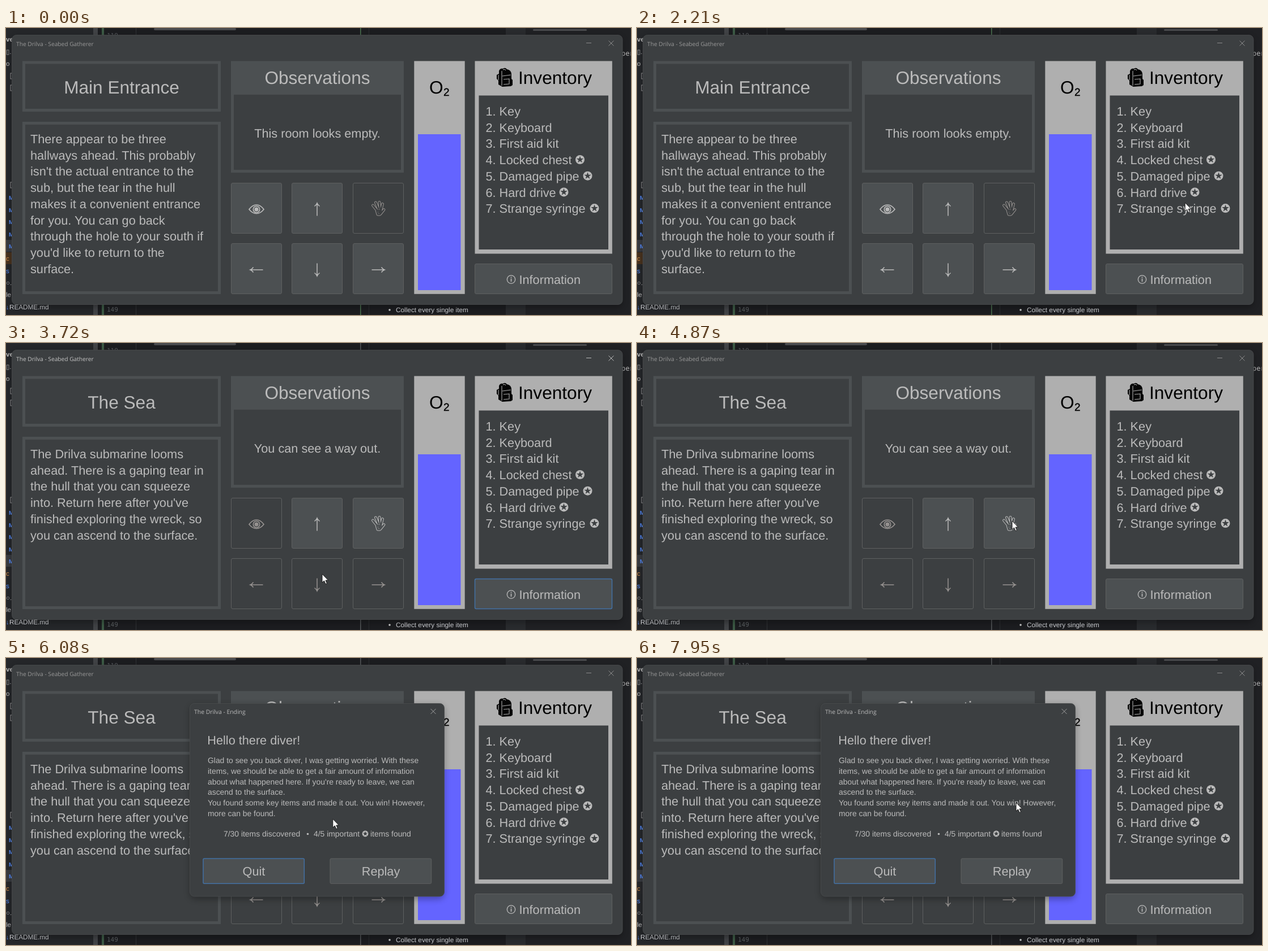
An HTML page for the animation above (8000 ms loop, 1103 by 508 pixels).

```html
<!DOCTYPE html>
<html lang="en">
<head>
<meta charset="utf-8">
<title>The Drilva</title>
<style>
  html, body { margin: 0; width: 100%; height: 100%; overflow: hidden; background: #1e1f22; }
  svg { display: block; width: 1103px; height: 508px; }
  text { font-family: "Liberation Sans", Arial, sans-serif; fill: #bbb; white-space: pre; text-rendering: geometricPrecision; }
  .ui { font-family: "Open Sans", "Noto Sans", sans-serif; }
  .mono { font-family: "DejaVu Sans Mono", monospace; }
</style>
</head>
<body>
<svg id="stage" viewBox="0 0 1103 508" xmlns="http://www.w3.org/2000/svg"></svg>
<script>
const NS = "http://www.w3.org/2000/svg";
const stage = document.getElementById("stage");
const BG = "#3c3f41", PANEL = "#4c5052", TEXT = "#bbbbbb", DIM = "#8b8b8b";
const LIGHT = "#afafaf", EDGE = "#5e6060", FOCUS = "#4270a4";
const HEADING = 31.6, BODY = 21.7, SMALL = 13.9;

function add(parent, tag, attrs = {}, content) {
  const node = document.createElementNS(NS, tag);
  set(node, attrs);
  if (content !== undefined) node.textContent = content;
  parent.appendChild(node);
  return node;
}
function set(node, attrs) {
  for (const key in attrs) node.setAttribute(key, attrs[key]);
}
const group = (parent, attrs) => add(parent, "g", attrs);
const rect = (parent, x, y, width, height, fill, more) =>
  add(parent, "rect", { x, y, width, height, fill, ...more });
const text = (parent, x, y, size, content, more) =>
  add(parent, "text", { x, y, "font-size": size, ...more }, content);
const path = (parent, d, more) => add(parent, "path", { d, ...more });
const centred = { "text-anchor": "middle" };

function lines(parent, x, y, size, step, rows) {
  rows.forEach((row, i) => text(parent, x, y + i * step, size, row));
}

function starBadge(parent, cx, cy, r) {
  add(parent, "circle", { cx, cy, r, fill: TEXT });
  const points = Array.from({ length: 10 }, (_, i) => {
    const a = i * Math.PI / 5 - Math.PI / 2, d = r * (i % 2 ? 0.32 : 0.82);
    return `${cx + d * Math.cos(a)},${cy + d * Math.sin(a)}`;
  });
  add(parent, "polygon", { points: points.join(" "), fill: BG });
}

function closeMark(parent, x, y) {
  return path(parent, `M${x - 4.5} ${y - 4.5}l9 9m0 -9l-9 9`, { stroke: "#a0a0a0", fill: "none" });
}

// Editor behind the window
function drawDesktop() {
  rect(stage, 0, 0, 1103, 508, "#1c1d20");
  rect(stage, 0, 0, 154, 508, "#25272a");
  rect(stage, 154, 0, 8, 508, "#414346");
  rect(stage, 169, 0, 4, 508, "#3c5a45");
  rect(stage, 882, 0, 35, 508, "#292b2e");
  rect(stage, 917, 0, 186, 508, "#202124");
  rect(stage, 229, 0, 1, 508, "#303235");
  rect(stage, 640, 0, 1, 508, "#2b2d30");
  const guide = rect(stage, 625, 0, 1.5, 508, "#4c7350");
  rect(stage, 261, 0, 145, 4, "#4a4b4e", { rx: 2 });
  rect(stage, 930, 2, 95, 3, "#4a4b4e", { rx: 1.5 });
  rect(stage, 0, 375, 14, 21, "#393b40");
  const warm = rect(stage, 0, 397, 14, 21, "#49331f");
  text(stage, 178, 17, 11, "119", { class: "mono", style: "fill:#55585c" });
  text(stage, 178, 502, 11, "149", { class: "mono", style: "fill:#5b5f62" });
  text(stage, 1086, 49, 12, "per", { class: "mono" });
  text(stage, 0, 24, 11.5, "ve", { "font-weight": "bold" });
  const tree = { 42: "▯.", 63: "o", 430: "s", 451: "○.", 472: "le" };
  for (const y in tree) text(stage, 0, +y + 4, 11.5, tree[y], { style: y === "430" ? "fill:#548af7" : "" });
  for (const y of [80, 101, 273]) rect(stage, 8, y, 6, 10, "none", { stroke: "#999" });
  for (let i = 0; i < 5; i++)
    text(stage, 5, 304 + i * 21.6, 10, "M", { "font-weight": "bold", style: "fill:#548af7" });
  text(stage, 0, 412, 11.5, "c", { style: "fill:#d08a45" });
  text(stage, 0, 498, 11, "↓", { style: "fill:#548af7" });
  text(stage, 6, 498, 11.7, "README.md", { style: "fill:#d0d2d6" });
  add(stage, "circle", { cx: 677, cy: 499, r: 1.8, fill: "#ccc" });
  text(stage, 688, 502.5, 11.8, "Collect every single item", { style: "fill:#d0d2d6" });
  return { guide, warm };
}

function shadowed(parent, x, y, w, h) {
  rect(parent, x, y + 3, w, h + 2, "#000", { rx: 10, opacity: 0.3, filter: "url(#soft)" });
  rect(parent, x, y, w, h, BG, { rx: 8, stroke: "#4b4d4f", "stroke-width": 0.8 });
}

function framed(parent, x, y, w, h) {
  rect(parent, x, y, w, h, PANEL);
  rect(parent, x + 5, y + 5, w - 10, h - 10, BG);
}

const arrow = angle => (g, cx, cy) =>
  path(g, "M0 11.5V-10.5M-4.5 -5.5Q-1 -8 0 -11Q1 -8 4.5 -5.5",
    { transform: `translate(${cx} ${cy}) rotate(${angle})`, fill: "none", stroke: "currentColor", "stroke-width": 1.5 });

function eye(g, cx, cy) {
  const icon = group(g, { transform: `translate(${cx} ${cy})`, fill: "none", stroke: "currentColor", "stroke-width": 1.7 });
  path(icon, "M-13 0Q-7 -8 0 -8T13 0Q7 7.5 0 7.5T-13 0Z");
  add(icon, "circle", { r: 5.7 });
  add(icon, "circle", { r: 2.7, fill: "currentColor" });
}

function hand(g, cx, cy) {
  const icon = group(g, { transform: `translate(${cx} ${cy - 1})`, fill: "none", "stroke-linecap": "round", "stroke-linejoin": "round" });
  const d = "M-3 2L-9.5 -6M0 0L-4.5 -11M3 0L2 -11.5M5 2L7.5 -8.5M4 9L10 1.5M-3 3L-1 10L3 10L5 3Z";
  path(icon, d, { stroke: "currentColor", "stroke-width": 4.8 });
  path(icon, d, { stroke: "var(--face)", "stroke-width": 2.8 });
  path(icon, "M-1 3L0 8H3L4 3Z", { fill: "var(--face)" });
}

function makeButton(parent, x, y, w, h, drawIcon) {
  const g = group(parent);
  const face = rect(g, x + 0.5, y + 0.5, w - 1, h - 1, PANEL, { rx: 2.5, stroke: EDGE });
  drawIcon(g, x + w / 2, y + h / 2 + 2);
  return {
    update(enabled, hover, focus) {
      const fill = !enabled ? BG : hover ? "#55595c" : PANEL;
      set(face, { fill, stroke: enabled && (hover || focus) ? FOCUS : EDGE, "stroke-width": enabled && focus ? 1.5 : 1 });
      g.style.color = enabled ? TEXT : "#969290";
      g.style.setProperty("--face", fill);
    },
    contains: (px, py) => px >= x && px <= x + w && py >= y && py <= y + h
  };
}

// Backpack seen from a three-quarter angle
function backpack(parent) {
  const g = group(parent, { transform: "translate(866 70)" });
  path(g, "M4 6Q6 1 11 2Q15 -1 18 3Q25 4 26 11V20L28 22V31L25 33L10 34L3 30V23L0 20V13L4 11Z", { fill: "#050505" });
  path(g, "M9 6V32M10 15L25 13M12 21L22 20V29L12 30M3 13V22M11 4Q14 2 16 5",
    { fill: "none", stroke: LIGHT, "stroke-width": 1.1 });
}

function drawWindow() {
  shadowed(stage, 10.5, 12.5, 1077.5, 477);
  const caption = text(stage, 18, 31.5, 10.2, "The Drilva - Seabed Gatherer", { class: "ui" });
  const marks = [
    path(stage, "M1024 26.5h9", { fill: "none" }),
    closeMark(stage, 1068, 27)
  ];

  framed(stage, 29, 58.5, 350, 89.5);
  framed(stage, 29, 166, 350, 305);
  const inside = group(stage), outside = group(stage);
  text(inside, 204, 116, HEADING, "Main Entrance", centred);
  lines(inside, 43, 204, BODY, 28.7, [
    "There appear to be three", "hallways ahead. This probably", "isn't the actual entrance to the",
    "sub, but the tear in the hull", "makes it a convenient entrance", "for you. You can go back",
    "through the hole to your south if", "you'd like to return to the", "surface."
  ]);
  text(inside, 549.5, 193.5, BODY, "This room looks empty.", centred);
  text(outside, 204, 116, HEADING, "The Sea", centred);
  lines(outside, 43, 204, BODY, 28.7, [
    "The Drilva submarine looms", "ahead. There is a gaping tear in", "the hull that you can squeeze",
    "into. Return here after you've", "finished exploring the wreck, so", "you can ascend to the surface."
  ]);
  text(outside, 549.5, 193.5, BODY, "You can see a way out.", centred);

  const observations = group(stage);
  rect(observations, 397, 58.5, 305, 197.5, PANEL);
  rect(observations, 402, 118, 295, 133, BG);
  text(observations, 549.5, 99, HEADING, "Observations", centred);
  stage.append(inside, outside);

  rect(stage, 720.3, 58.5, 89.4, 412.3, LIGHT);
  const oxygen = rect(stage, 727, 188, 75.5, 276, "#6464ff");
  text(stage, 747, 116, HEADING, "O", { style: "fill:#000" });
  text(stage, 772, 119.5, 19, "2", { style: "fill:#000", stroke: "#000", "stroke-width": 0.3 });

  rect(stage, 827.5, 58.5, 242.3, 341, LIGHT);
  rect(stage, 834.5, 119.5, 228.5, 272.5, BG);
  backpack(stage);
  text(stage, 904, 99, HEADING, "Inventory", { style: "fill:#000" });
  lines(stage, 846.5, 155, BODY, 28.7, [
    "1. Key", "2. Keyboard", "3. First aid kit", "4. Locked chest", "5. Damaged pipe", "6. Hard drive", "7. Strange syringe"
  ]);
  [1013, 1026.5, 984.5, 1038.5].forEach((x, i) => starBadge(stage, x, 233 + i * 28.7, 8));

  const buttons = {
    look: makeButton(stage, 397, 274, 90, 90, eye),
    up: makeButton(stage, 504, 274, 90, 90, arrow(0)),
    take: makeButton(stage, 612, 274, 90, 90, hand),
    left: makeButton(stage, 397, 381, 90, 90, arrow(-90)),
    down: makeButton(stage, 504, 381, 90, 90, arrow(180)),
    right: makeButton(stage, 612, 381, 90, 90, arrow(90)),
    info: makeButton(stage, 827, 417, 243, 54, g => {
      add(g, "circle", { cx: 891.5, cy: 445, r: 7.2, fill: "none", stroke: TEXT, "stroke-width": 1.3 });
      path(g, "M891.5 443.5v5.5m0 -8.5v1.7", { stroke: TEXT, "stroke-width": 1.6 });
      text(g, 905.5, 453, BODY, "Information");
    })
  };
  return { caption, marks, inside, outside, oxygen, buttons };
}

function drawDialog() {
  const g = group(stage);
  shadowed(g, 324.5, 80.5, 449, 341.5);
  text(g, 332, 98.5, 10.4, "The Drilva - Ending", { class: "ui" });
  closeMark(g, 754, 94.5);
  text(g, 355.3, 153, BODY, "Hello there diver!");
  lines(g, 356, 186, SMALL, 18.75, [
    "Glad to see you back diver, I was getting worried. With these",
    "items, we should be able to get a fair amount of information",
    "about what happened here. If you're ready to leave, we can",
    "ascend to the surface.",
    "You found some key items and made it out. You win! However,",
    "more can be found."
  ]);
  text(g, 384, 316, SMALL, "7/30 items discovered");
  add(g, "circle", { cx: 532.5, cy: 311.5, r: 1.8, fill: TEXT });
  text(g, 543, 316, SMALL, "4/5 important");
  starBadge(g, 634, 311, 5.4);
  text(g, 643, 316, SMALL, "items found");
  rect(g, 348, 355, 178.3, 44.3, PANEL, { rx: 2, stroke: FOCUS, "stroke-width": 1.5 });
  rect(g, 572, 355, 178.7, 44.3, PANEL, { rx: 2, stroke: EDGE });
  text(g, 437.5, 385, BODY, "Quit", centred);
  text(g, 661.5, 385, BODY, "Replay", centred);
  return g;
}

const filter = add(add(stage, "defs"), "filter", { id: "soft", x: "-10%", y: "-10%", width: "120%", height: "120%" });
add(filter, "feGaussianBlur", { stdDeviation: 6 });
const desktop = drawDesktop();
const main = drawWindow();
const dialog = drawDialog();
const cursor = path(stage, "M0 0V15L3.5 11.8L6 17.5L8.4 16.5L6 11H10.6Z",
  { fill: "#fff", stroke: "#111", "stroke-width": 0.9, "stroke-linejoin": "round" });

// Pointer path: time, x, y
const route = [
  [70, 1000, 486], [400, 1004, 410], [850, 1014, 315], [900, 1014, 284], [1080, 1023, 232],
  [1200, 990, 206], [1350, 930, 232], [1450, 902, 290], [1560, 920, 336], [1680, 975, 315],
  [1820, 1025, 262], [1950, 1016, 215], [2080, 955, 242], [2210, 967, 309], [2360, 1003, 314],
  [2500, 1010, 284], [2720, 880, 322], [3000, 665, 398], [3330, 558, 409], [3930, 558, 409],
  [4080, 572, 350], [4250, 630, 316], [4410, 662, 315], [5600, 662, 315], [5860, 625, 294],
  [6080, 577, 285], [6250, 546, 294], [6410, 540, 318], [6600, 565, 322], [6800, 592, 300],
  [7000, 563, 270], [7250, 580, 256], [7450, 640, 240], [7680, 696, 242], [7950, 669, 256], [8000, 669, 256]
];

function slope(i, axis) {
  const a = route[i - 1], b = route[i], c = route[i + 1];
  const still = (p, q) => p[1] === q[1] && p[2] === q[2];
  if (!a || !c || still(a, b) || still(b, c)) return 0;
  return (c[axis] - a[axis]) / (c[0] - a[0]);
}

function pointer(t) {
  let i = 0;
  while (i < route.length - 2 && t >= route[i + 1][0]) i++;
  const a = route[i], b = route[i + 1], span = b[0] - a[0];
  const u = Math.max(0, (t - a[0]) / span), v = 1 - u;
  return [1, 2].map(k =>
    v * v * (1 + 2 * u) * a[k] + u * u * (3 - 2 * u) * b[k] +
    span * u * v * (v * slope(i, k) - u * slope(i + 1, k)));
}

const show = (node, on) => node.style.display = on ? "" : "none";

function render(t) {
  const [x, y] = pointer(t);
  const active = t >= 3460 && t < 4870, atSea = t >= 3590, ending = t >= 4940;

  show(cursor, t >= 70);
  set(cursor, { transform: `translate(${x} ${y})` });

  main.caption.style.fill = active ? "#c4c4c4" : "#999";
  main.marks.forEach(mark => set(mark, { stroke: active ? TEXT : DIM }));
  set(desktop.guide, { fill: t >= 3460 ? "#55585a" : "#4c7350" });
  set(desktop.warm, { fill: t >= 3460 ? "#27282b" : "#49331f" });

  show(main.inside, !atSea);
  show(main.outside, atSea);
  const level = atSea ? 197 : 188;
  set(main.oxygen, { y: level, height: 464 - level });

  const enabled = atSea ? ["up", "take", "info"] : ["look", "up", "left", "down", "right", "info"];
  for (const name in main.buttons) {
    const button = main.buttons[name];
    const hover = t >= 70 && t < 4870 && button.contains(x, y);
    button.update(enabled.includes(name), hover, name === "info" && active && atSea);
  }

  show(dialog, ending);
  const left = 1 - Math.min(1, Math.max(0, (t - 4940) / 330));
  const scale = 1 - 0.143 * left * left;
  set(dialog, {
    transform: `translate(490 208) scale(${scale}) translate(-490 -208)`,
    opacity: Math.min(1, Math.max(0, (t - 4920) / 120))
  });
}

const start = performance.now();
function tick(now) {
  render(Math.max(0, now - start) % 8000);
  requestAnimationFrame(tick);
}
render(0);
requestAnimationFrame(tick);
</script>
</body>
</html>
```
